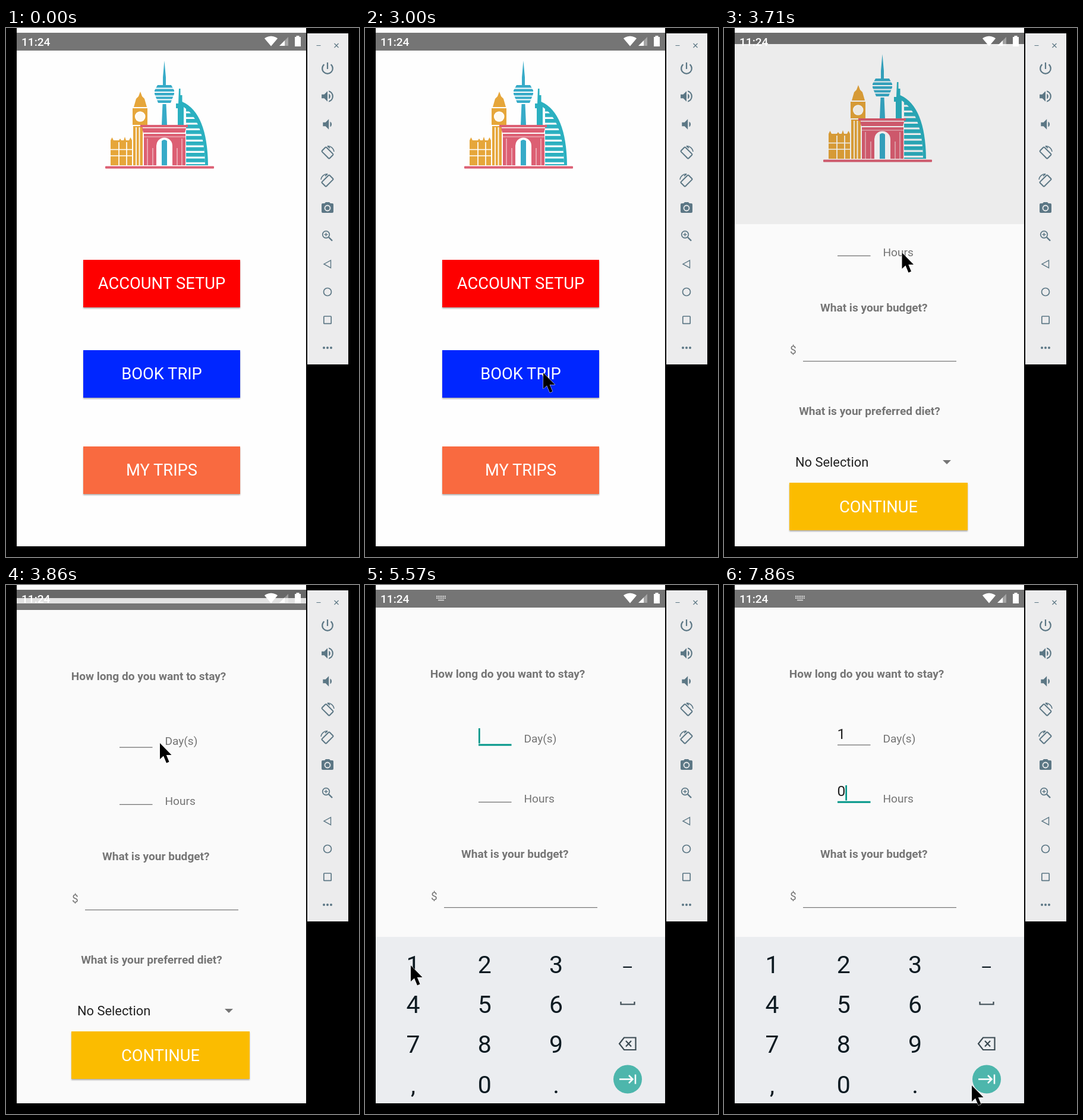
Recreate the animation shown at these times as an HTML page. Size 594 by 890 pixels, loop 8000 ms.

```html
<!DOCTYPE html>
<html lang="en">
<head>
<meta charset="utf-8">
<title>Trip booking demo</title>
<style>
  html, body { margin: 0; width: 100%; height: 100%; overflow: hidden; background: #000; }
  svg { display: block; width: 594px; height: 890px; font-family: Roboto, sans-serif; }
  .button { font-size: 27.3px; fill: #fff; text-anchor: middle; }
  .label { font-size: 19.1px; fill: #757575; }
  .title { font-weight: 700; text-anchor: middle; }
  .value { font-size: 24.6px; fill: #212121; }
  .key { font-size: 41px; fill: #0e1b22; text-anchor: middle; }
  .line { fill: none; stroke: #5c7785; stroke-width: 1.7; }
</style>
</head>
<body>
<svg viewBox="0 0 594 890">
  <defs>
    <clipPath id="phone"><rect x="18" y="8" width="487" height="864"/></clipPath>
    <clipPath id="reveal"><rect id="revealBox" x="18" y="8" width="487" height="864"/></clipPath>
    <clipPath id="sail"><path d="M303 131Q334 155 335 231H303Z"/></clipPath>
    <pattern id="floors" y="134" width="60" height="9.5" patternUnits="userSpaceOnUse"><path fill="#2bb0c0" d="M0 0H60V6.3H0Z"/></pattern>
    <filter id="shadow" x="-5%" y="-10%" width="110%" height="125%"><feDropShadow dx="0" dy="2" stdDeviation="1.3" flood-opacity=".3"/></filter>
    <g id="rotate" class="line">
      <rect x="-9" y="-5.2" width="18" height="10.4" rx="1.5" transform="translate(0 1)rotate(45)" stroke-width="2"/>
      <path d="M0-10.5A11 11 0 0 1 11-1M0-10.5L4-7"/>
    </g>
  </defs>

  <rect x="18" width="487" height="872" fill="#fdfdfd"/>

  <g clip-path="url(#phone)">
    <g id="home">
      <rect x="18" y="8" width="487" height="900" fill="#fefefe"/>
      <rect x="18" y="8" width="487" height="30" fill="#757575"/>
      <g id="skyline">
        <g fill="#e6a63a">
          <path d="M176 231V189L178.500 184L181 189H190L192 186L194 189H198L200 183L202 189H207L209.500 184L212 189V231ZM214 231V165H230V231ZM213 135H238V163H213ZM215 133L219 119L223 115L226 107L229 115L233 119L237 133Z"/>
          <path d="M176 204.500H212M176 215H212M190 192V231M203 192V231M219 167V231M224.500 167V231" stroke="#fff" stroke-width="1.7"/>
          <circle cx="225.700" cy="149" r="8.800" fill="#fff"/><circle cx="225.700" cy="149" r="6.800" fill="#fffaf0"/>
        </g>
        <g fill="#37abc8">
          <path d="M266.500 55L269 83V97H264V83ZM255 96H278L283 105V111L277 126H256L250 111V105ZM263.500 128H269.500L271 163H262Z"/>
          <path d="M249 101.500H284M249 108H284M250 114.500H283M253 120.500H280" stroke="#fff" stroke-width="1.8"/>
        </g>
        <g fill="#2bb0c0">
          <path d="M291 102H293.500V113H296.500V124Q339 143 340 231H335Q334 156 299 133V164H289V135H286V127H290Z"/>
          <rect x="303" y="130" width="34" height="101" fill="url(#floors)" clip-path="url(#sail)"/>
        </g>
        <g fill="#dc5f73">
          <path d="M226 163H306V167H226ZM229 168.500H303L301 176H231ZM232 178H302V231H232Z"/>
          <path d="M232 183H302M238 186V231M247 202V231M288 202V231M296 186V231" stroke="#fff" stroke-width="1.2" opacity=".7"/>
          <path d="M253 231V198A13.500 13.500 0 0 1 280 198V231Z" fill="#fff"/>
          <path d="M262 231V190Q266.500 186 271 190V231Z" fill="#37abc8"/>
          <rect x="167" y="232.500" width="183" height="4" rx="1"/>
        </g>
      </g>
      <g filter="url(#shadow)">
        <rect x="130" y="390" width="264" height="80" fill="#fe0000"/>
        <rect x="130" y="542" width="264" height="80" fill="#0025ff"/>
        <rect x="130" y="704" width="264" height="80" fill="#f96a3f"/>
      </g>
      <g class="button">
        <text x="262" y="439">ACCOUNT SETUP</text>
        <text x="262" y="591">BOOK TRIP</text>
        <text x="262" y="753">MY TRIPS</text>
      </g>
    </g>
    <rect id="dim" x="18" y="8" width="487" height="864"/>
  </g>

  <g id="formWindow" clip-path="url(#reveal)">
    <g id="form">
      <rect x="18" y="8" width="487" height="900" fill="#fafafa"/>
      <rect x="18" y="8" width="487" height="30" fill="#757575"/>
      <g class="label">
        <text class="title" x="240" y="156">How long do you want to stay?</text>
        <text x="267.500" y="265">Day(s)</text>
        <text x="267.500" y="366">Hours</text>
        <text class="title" x="252.300" y="459">What is your budget?</text>
        <text x="111" y="530">$</text>
        <text class="title" x="245" y="633">What is your preferred diet?</text>
      </g>
      <rect id="dayLine" x="191" width="55.500"/>
      <rect id="hourLine" x="191" width="55.500"/>
      <rect x="133" y="542" width="258" height="1.200" fill="#757575"/>
      <text id="day" class="value" x="190.500" y="259">1</text>
      <text id="hour" class="value" x="190.500" y="355">0</text>
      <rect id="caret" width="2.700" height="25.500" fill="#009688"/>
      <text x="120" y="720" font-size="21.85" fill="#212121">No Selection</text>
      <path d="M368 709H382L375 716Z" fill="#757575"/>
      <rect x="110" y="747" width="300" height="80" fill="#fbbc05" filter="url(#shadow)"/>
      <text class="button" x="260" y="796.500">CONTINUE</text>
    </g>
    <g id="keyboard">
      <rect x="18" y="592" width="487" height="280" fill="#ebedf0"/>
      <g id="keys"></g>
      <path d="M430.500 701V705.500H453.500V701" fill="none" stroke="#3b4a52" stroke-width="2.200"/>
      <path d="M436 761.500H455.500V782H436L428 771.700ZM439 767L448 776.500M448 767L439 776.500" fill="none" stroke="#3b4a52" stroke-width="2.200"/>
      <circle cx="442" cy="831.500" r="24" fill="#4db6ac"/>
      <path d="M428 831.500H450M444 825L450.500 831.500L444 838M455 823.500V839.500" fill="none" stroke="#fff" stroke-width="2.500"/>
    </g>
  </g>

  <g fill="#fff">
    <text x="26" y="30" font-size="19.100" font-weight="500">11:24</text>
    <path d="M435 17.500Q446 10 457 17.500L446 30.500ZM475 15V30H460Z" fill-opacity=".35"/>
    <path d="M435 17.500Q446 10 457 17.500L446 30.500ZM469 21V30H460ZM486 15H488.500V13H493.500V15H496V31H486Z"/>
    <g id="keyboardIcon" fill="none" stroke="#ddd">
      <path d="M120 19H136M120 22H136" stroke-width="1.800" stroke-dasharray="1.800 1"/>
      <path d="M123 25.500H133" stroke-width="1.600"/>
    </g>
  </g>

  <rect x="507" y="9" width="69" height="557" fill="#ececed"/>
  <path class="line" d="M522.500 29.500H529.500M552.500 26L559.500 33M559.500 26L552.500 33" style="stroke-width:1.2"/>
  <g fill="#5c7785">
    <path transform="translate(527.800 54.800)scale(1.1)" d="M13 3h-2v10h2zm4.830 2.170l-1.420 1.420A7 7 0 1 1 7.580 6.580L6.170 5.170A9 9 0 1 0 17.830 5.170z"/>
    <path transform="translate(527.800 101.800)scale(1.1)" d="M3 9v6h4l5 5V4L7 9zM16.500 12A4.500 4.500 0 0 0 14 7.970V16A4.500 4.500 0 0 0 16.500 12zM14 3.230v2.060a7 7 0 0 1 0 13.420v2.060a9 9 0 0 0 0-17.540z"/>
    <path transform="translate(527.800 148.800)scale(1.1)" d="M18.500 12A4.500 4.500 0 0 0 16 7.970V16A4.500 4.500 0 0 0 18.500 12zM5 9v6h4l5 5V4L9 9z"/>
    <path d="M538 293H544L546 295H549Q551 295 551 297V309Q551 311 549 311H533Q531 311 531 309V297Q531 295 533 295H536Z"/>
    <circle cx="541" cy="303" r="4.500" fill="none" stroke="#ececed" stroke-width="1.800"/>
    <circle cx="535" cy="538" r="2"/><circle cx="541" cy="538" r="2"/><circle cx="547" cy="538" r="2"/>
  </g>
  <use href="#rotate" x="541" y="209"/>
  <use href="#rotate" transform="translate(541 256)scale(-1 1)"/>
  <g class="line">
    <circle cx="538.500" cy="347.500" r="5.800"/>
    <path d="M543 352L549 358" style="stroke-width:2.4"/>
    <path d="M535.500 347.500H541.500M538.500 344.500V350.500M546.500 391V403.500L535 397.200Z" style="stroke-width:1.4"/>
    <circle cx="541" cy="444" r="6.500"/>
    <rect x="534.800" y="485" width="12.400" height="12.400" rx="1"/>
  </g>

  <path id="pointer" d="M0 0V27L6 21.500L11 33.500L15.500 31.500L10.800 20H19.500Z" stroke="#fff" stroke-width="1" paint-order="stroke"/>
</svg>
<script>
const $ = id => document.getElementById(id);
const set = (id, attrs) => Object.entries(attrs).forEach(([name, value]) => $(id).setAttribute(name, value));
const show = (id, on) => set(id, { visibility: on ? 'visible' : 'hidden' });

const LOOP = 8000, FPS = 7;

// Pointer stops: tick, x, y
const stops = [
  [6, 505, 690], [9, 434, 586], [14, 434, 586], [18, 300, 580], [24, 300, 580],
  [25, 340, 490], [27, 259, 266], [28, 229, 254], [32, 227, 253], [33, 227, 264],
  [35, 227, 264], [39, 77, 640], [40, 77, 640], [42, 438, 822], [45, 438, 822],
  [47, 209, 836], [49, 205, 852], [50, 205, 852], [55, 417, 842]
];

function pointerAt(tick) {
  const i = stops.findIndex(stop => stop[0] >= tick);
  const b = stops[i], a = stops[Math.max(0, i - 1)];
  const p = a === b ? 0 : (tick - a[0]) / (b[0] - a[0]);
  return [a[1] + (b[1] - a[1]) * p, a[2] + (b[2] - a[2]) * p];
}

$('keys').innerHTML = ['123–', '456', '789', ',0.'].map((row, r) =>
  [...row].map((key, c) =>
    `<text class="key" x="${81 + c * 120.3}" y="${653 + r * 67.2}"${key === '–' ? ' font-size="30" style="font-size:30px"' : ''}>${key}</text>`
  ).join('')).join('');

function underline(id, y, focused) {
  set(id, { y: focused ? y - 1 : y, height: focused ? 3 : 1.3, fill: focused ? '#009688' : '#757575' });
}

function draw(tick) {
  // Screen change: the new window slides up while it is uncovered from below
  const opening = tick === 26, settling = tick === 27;
  const top = opening ? 330 : settling ? 31 : 8;
  set('home', { transform: `translate(0 ${opening ? -11 : settling ? -16 : 0})` });
  set('dim', { opacity: opening ? 0.07 : settling ? 0.11 : 0 });
  set('revealBox', { y: top, height: 872 - top });
  set('form', { transform: `translate(0 ${opening ? 18 : settling ? 4 : 0})` });
  show('formWindow', tick >= 26);

  const onHours = tick >= 45, hasDay = tick >= 41, hasHour = tick >= 51;
  underline('dayLine', 268.5, tick >= 34 && !onHours);
  underline('hourLine', 364.7, onHours);
  set('day', { opacity: +hasDay });
  set('hour', { opacity: +hasHour });
  set('caret', {
    x: (onHours ? hasHour : hasDay) ? 204.3 : 191,
    y: onHours ? 337 : 241,
    opacity: +(tick >= 34)
  });

  set('keyboard', { transform: `translate(0 ${tick < 36 ? 300 : tick === 36 ? 90 : 0})` });
  show('keyboardIcon', tick >= 37);

  show('pointer', tick >= 6);
  set('pointer', { transform: `translate(${pointerAt(tick)})` });
}

function frame() {
  const time = performance.now() % LOOP;
  draw(Math.min(55, Math.floor((time + 5) * FPS / 1000)));
  requestAnimationFrame(frame);
}
frame();
</script>
</body>
</html>
```
